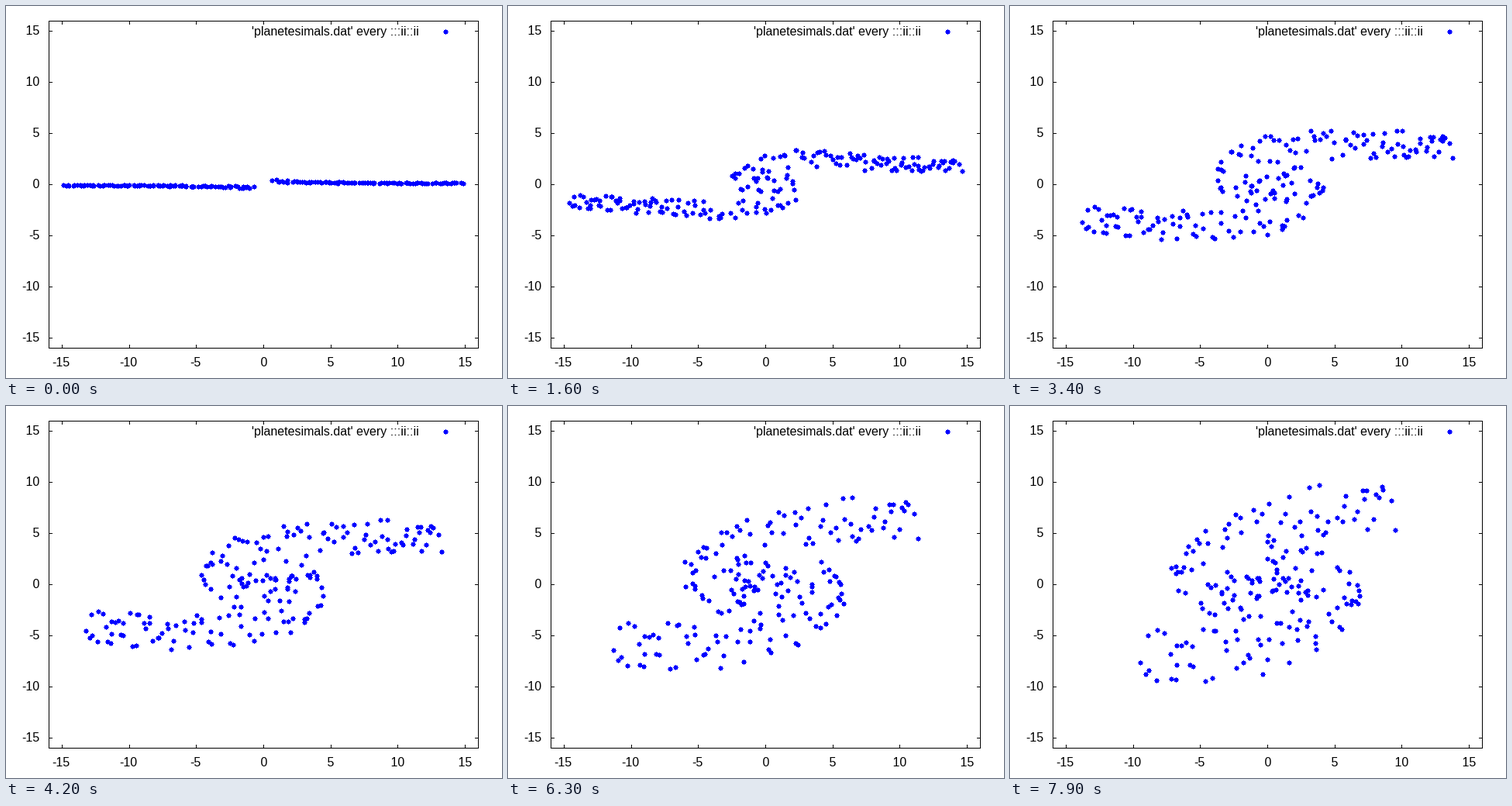
Write a matplotlib script that moves like this. It is 640 px wide and 480 px high and loops after 8000 ms.

```python
import numpy as np
import matplotlib.pyplot as plt
from matplotlib.animation import FuncAnimation
from matplotlib.path import Path

W, H, DPI = 640, 480, 100
PX = 72 / DPI                      # one pixel in points
LEFT, RIGHT, TOP, BOTTOM = 55, 609, 19, 441
LIMIT = 16
FRAMES, INTERVAL = 80, 100
PER_SIDE = 98
GM = 0.4                           # star's pull, per frame squared
STEPS = 20                         # integration steps per frame


def start_state(rng):
    """Bodies strewn along the x axis on near-circular, tilted orbits."""
    n = 2 * PER_SIDE
    side = np.repeat([1, -1], PER_SIDE)
    radius = np.tile(np.linspace(0.95, 14.8, PER_SIDE), 2)
    radius += rng.uniform(-0.15, 0.15, n)
    speed = np.sqrt(GM / radius) * rng.normal(1, 0.025, n)
    tilt = np.cos(rng.uniform(0.6, 1.18, n))
    pos = np.array([side * radius, np.zeros(n)])
    vel = np.array([np.zeros(n), side * speed])
    return pos, vel, tilt


def pull(pos):
    return -GM * pos / np.hypot(*pos) ** 3


def trace_orbits():
    """Leapfrog in each orbit's plane, then flatten y by its tilt."""
    pos, vel, tilt = start_state(np.random.default_rng(12))
    dt = 1 / STEPS
    track = []
    for _ in range(FRAMES):
        for _ in range(STEPS):
            vel = vel + pull(pos) * dt / 2
            pos = pos + vel * dt
            vel = vel + pull(pos) * dt / 2
        track.append((pos[0], pos[1] * tilt))
    return track


def px(x):
    return LEFT + (x + LIMIT) * (RIGHT - LEFT) / (2 * LIMIT)


def py(y):
    return BOTTOM - (y + LIMIT) * (BOTTOM - TOP) / (2 * LIMIT)


track = trace_orbits()
fig = plt.figure(figsize=(W / DPI, H / DPI), dpi=DPI, facecolor="white")
ax = fig.add_axes([0, 0, 1, 1])
ax.set_xlim(0, W)
ax.set_ylim(H, 0)
ax.axis("off")


def line(xs, ys):
    ax.plot(xs, ys, color="black", lw=PX, antialiased=False, snap=True,
            solid_capstyle="projecting", solid_joinstyle="miter")


def label(x, baseline, text, align):
    ax.text(x, baseline, text, ha=align, va="baseline",
            family="Liberation Sans", size=16 * PX, color="black")


def dot_marker():
    quarter = [(0.5, 3.5), (0.5, 2.5), (2.5, 2.5), (2.5, 0.5), (3.5, 0.5)]
    half = quarter + [(x, -y) for x, y in reversed(quarter)]
    points = half + [(-x, -y) for x, y in half]
    return Path(points + points[:1], closed=True)


def dots(xs, ys):
    return ax.plot(xs, ys, ls="none", marker=dot_marker(), ms=7 * PX, mew=0,
                   color="#0000ff", antialiased=False, zorder=3)[0]


line([LEFT, RIGHT, RIGHT, LEFT, LEFT], [TOP, TOP, BOTTOM, BOTTOM, TOP])
for v in range(-15, 16, 5):
    x, y = px(v), py(v)
    line([x, x], [BOTTOM, BOTTOM - 4])
    line([x, x], [TOP, TOP + 4])
    line([LEFT, LEFT + 4], [y, y])
    line([RIGHT, RIGHT - 4], [y, y])
    label(x - 1.5, 465, f"{v: d}", "center")
    label(43, round(y) + 5, f"{v: d}", "right")

label(533, 38, "'planetesimals.dat' every :::ii::ii", "right")
dots([567], [33])
swarm = dots([], [])


def update(frame):
    x, y = track[frame]
    swarm.set_data(px(x), py(y))
    return swarm,


anim = FuncAnimation(fig, update, frames=FRAMES, interval=INTERVAL,
                     repeat=True, repeat_delay=0)
plt.show()
```
